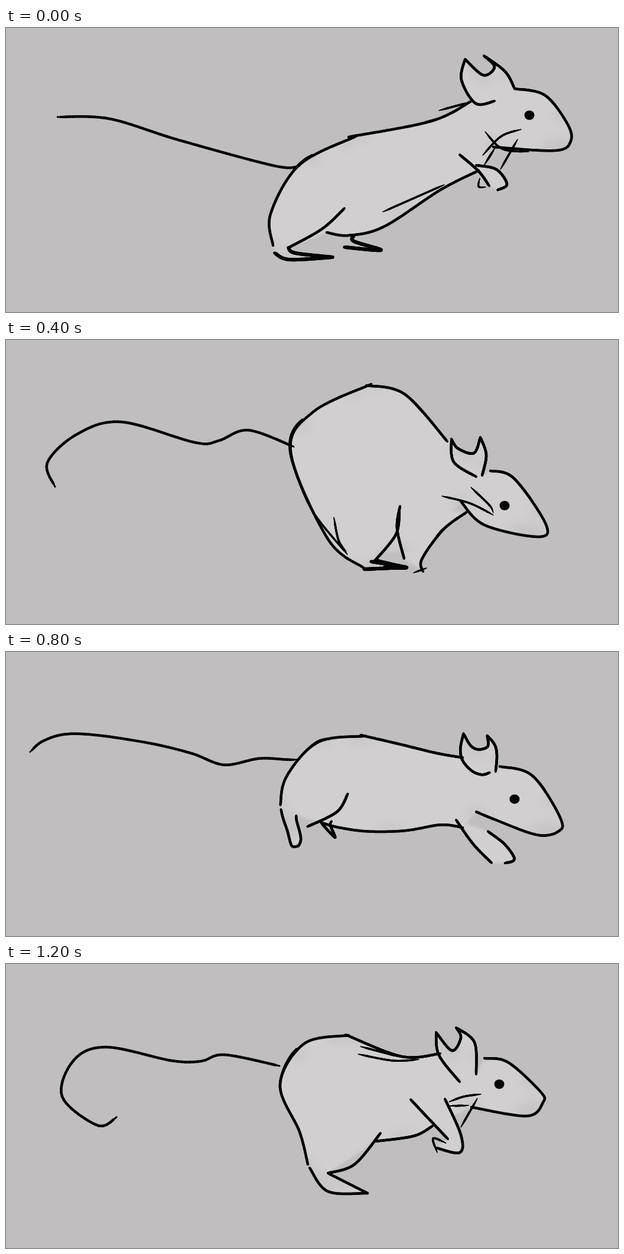
An HTML page with a canvas for the animation above (1.28 s loop, 1036x482 px).

```html
<!DOCTYPE html>
<html lang="en">
<head>
<meta charset="utf-8">
<title>Running mouse</title>
<style>
html, body { margin: 0; width: 100%; height: 100%; overflow: hidden; background: #c0bebf; }
canvas { display: block; width: 1036px; height: 482px; }
</style>
</head>
<body>
<canvas id="stage" width="1036" height="482"></canvas>
<script>
const ctx = document.getElementById('stage').getContext('2d');
const BG = '#c0bebf', SKIN = '#d1cfd0', INK = '#050505';
const STEP = 80, SAMPLES = 80, THICK = 4.5, THIN = 3.4;

// Each curve runs smoothly through a few key points; a repeated point is a corner.
// An eye has one place for each of the two laps.
const reach = {
  eyes: ['886 148', '884 143'],
  parts: {
    tail: '87 151 175 154 292 190 455 234 497 234',
    rump: '452 369 448 315 497 232 592 184',
    back: '580 185 720 158 788 124',
    earL: '777 53 771 88 795 128 827 124',
    earIn: '777 53 808 80 827 66 809 47',
    earR: '809 47 845 74 861 103',
    head: '861 103 912 114 950 162 956 192 930 208 825 202',
    cheek: '807 216 838 184 872 172',
    belly: '800 242 735 275 640 337 580 352 543 347',
    thigh: '573 306 535 341 478 373',
    armA: '768 215 800 243 818 268',
    armB: '796 233 830 240 848 265 832 275',
    hindFoot: '478 373 490 382 553 389 553 389 480 393 455 382',
    farFoot: '589 352 589 362 635 377 573 372'
  },
  extra: ['811 176 840 205 885 210', '866 189 837 240', '828 203 810 232', '802 255 800 269 812 270', '638 312 742 266', '733 140 785 126']
};

const dive = {
  eyes: ['822 310', '817 303'],
  parts: {
    tail: '55 179 72 151 120 132 235 138 315 156 370 179 430 155 490 157',
    rump: '472 205 491 158 540 115 605 122',
    back: '600 119 672 160 741 207',
    earL: '748 181 745 222 772 247 786 245',
    earIn: '748 181 757 204 780 208 789 189',
    earR: '789 189 798 212 783 253',
    head: '793 240 845 257 892 338 888 357 850 361 782 323 755 306',
    belly: '735 326 704 309 640 303 524 261',
    thigh: '573 208 565 237 524 258',
    armA: '735 320 762 370 795 403',
    armB: '797 340 834 391 820 400',
    hindFoot: '497 230 483 283 455 300 465 255 472 210',
    farFoot: '526 255 512 284 510 250'
  },
  extra: ['669 297 690 299 732 326', '762 320 776 362 802 396', '770 325 785 360 808 397', '786 400 828 396', '705 187 738 205', '494 240 540 259']
};

const crouch = {
  eyes: ['844 281', '844 277'],
  hidden: ['belly'],
  parts: {
    tail: '83 249 70 208 120 160 195 139 320 174 360 171 410 153 487 181',
    rump: '606 387 545 338 482 190 520 122 618 75',
    back: '610 77 675 92 747 172',
    earL: '754 168 758 207 796 232',
    earIn: '754 168 765 184 792 192 803 165',
    earR: '803 165 813 195 806 230',
    head: '820 222 860 235 914 313 900 334 810 314 770 274',
    cheek: '738 265 785 277 825 297',
    belly: '700 360 630 360',
    thigh: '666 290 660 330 625 374',
    armA: '780 292 740 322 704 372 706 393',
    armB: '667 282 662 320 674 371',
    hindFoot: '625 374 676 386 676 386 606 389',
    farFoot: '618 376 678 386 640 386'
  },
  extra: ['488 220 520 292 578 364', '555 301 563 340 576 359', '787 250 818 280 825 293', '690 395 712 387']
};

const rise = {
  eyes: ['836 207', '835 204'],
  hidden: ['farFoot'],
  parts: {
    tail: '187 260 155 274 95 225 115 163 170 141 280 164 330 165 370 154 463 173',
    rump: '511 340 497 285 464 205 505 135 580 121',
    back: '575 120 670 157 735 152',
    earL: '728 116 733 155 768 200',
    earIn: '728 116 755 147 770 125 762 108',
    earR: '762 108 793 133 796 187',
    head: '810 160 850 167 905 217 909 235 882 258 788 243',
    cheek: '750 234 775 225 804 221',
    belly: '722 275 690 292 625 301',
    thigh: '634 287 590 340 545 355',
    armA: '685 230 715 262 748 297',
    armB: '743 229 770 290 768 320 728 312',
    hindFoot: '545 355 612 389 612 389 545 386 514 346',
    farFoot: '550 360 600 380'
  },
  extra: ['600 140 668 158', '596 153 655 164 699 162', '798 228 770 277', '750 241 783 240', '745 304 723 296 730 320']
};

const mix = (a, b, k) => a + (b - a) * k;
const mixPts = (a, b, k) => a.map((p, i) => p.map((v, j) => mix(v, b[i][j], k)));

function points(text) {
  const n = text.split(' ').map(Number), pts = [];
  for (let i = 0; i < n.length; i += 2) pts.push([n[i], n[i + 1]]);
  return pts;
}

// Smooth curve through the points, sampled evenly by length.
function curve(text) {
  const pts = points(text);
  const at = i => pts[Math.max(0, Math.min(pts.length - 1, i))];
  const fine = [pts[0]], len = [0];
  for (let i = 0; i < pts.length - 1; i++) {
    const [a, b, c, d] = [at(i - 1), at(i), at(i + 1), at(i + 2)];
    if (b[0] === c[0] && b[1] === c[1]) continue;
    for (let s = 1; s <= 24; s++) {
      const t = s / 24;
      const p = [0, 1].map(j => b[j] + t / 2 * (c[j] - a[j] +
        t * (2 * a[j] - 5 * b[j] + 4 * c[j] - d[j] + t * (3 * (b[j] - c[j]) + d[j] - a[j]))));
      const q = fine[fine.length - 1];
      len.push(len[len.length - 1] + Math.hypot(p[0] - q[0], p[1] - q[1]));
      fine.push(p);
    }
  }
  const total = len[len.length - 1], out = [];
  for (let i = 0, k = 1; i <= SAMPLES; i++) {
    const want = total * i / SAMPLES;
    while (k < len.length - 1 && len[k] < want) k++;
    const t = (want - len[k - 1]) / (len[k] - len[k - 1] || 1);
    out.push(mixPts([fine[k - 1]], [fine[k]], t)[0]);
  }
  return out;
}

function keyPose({ eyes, parts, extra, hidden = [] }) {
  const curves = Object.entries(parts).map(([name, text]) => [name, curve(text)]);
  return { parts: Object.fromEntries(curves), extra: extra.map(curve), eyes: eyes.flatMap(points), hidden };
}

function between(a, b, k, stretch = 1) {
  const blend = (p, q) => mixPts(p, q, k).map(([x, y]) => [480 + (x - 480) * stretch, y]);
  const parts = {};
  for (const name in a.parts) {
    if (b.parts[name]) parts[name] = blend(a.parts[name], b.parts[name]);
  }
  return { parts, extra: [], eyes: blend(a.eyes, b.eyes), hidden: [] };
}

const [A, B, C, D] = [reach, dive, crouch, rise].map(keyPose);
const poses = [A, between(A, B, 1 / 3, 1.06), between(A, B, 2 / 3, 1.06), B, between(B, C, .5), C, between(C, D, .5), D];

function randomFrom(seed) {
  return () => (seed = seed * 16807 % 2147483647) / 2147483647;
}

function shape(pts) {
  const path = new Path2D();
  pts.forEach(([x, y]) => path.lineTo(x, y));
  path.closePath();
  return path;
}

// A brush line, narrower at its ends by the given share.
function ink(pts, width, tip = .8) {
  const gap = Math.hypot(pts[1][0] - pts[0][0], pts[1][1] - pts[0][1]);
  ctx.strokeStyle = INK;
  for (let i = 1; i < pts.length; i++) {
    const edge = Math.min(i, pts.length - i) * gap;
    ctx.lineWidth = width * Math.min(1, tip + edge / 20);
    ctx.beginPath();
    ctx.moveTo(...pts[i - 1]);
    ctx.lineTo(...pts[i]);
    ctx.stroke();
  }
}

// Goes over a random stretch of a line again, drifting off it slightly.
function retrace(pts, random) {
  const from = Math.floor(random() * SAMPLES * .65), count = Math.floor(SAMPLES * .3);
  const drift = mix(-3, 3, random());
  const part = pts.slice(from, from + count);
  ink(part.map(([x, y], i) => [x + drift * i / count, y + drift * (i / count - .5)]), THIN, .3);
}

function blob([x, y], rx, ry, color) {
  ctx.fillStyle = color;
  ctx.beginPath();
  ctx.ellipse(x, y, rx, ry, 0, 0, 7);
  ctx.fill();
}

function lineStyle(name, pts) {
  if (name === 'tail') return [THICK, .35];
  if (name === 'cheek') return [THIN, .35];
  const planted = name.endsWith('Foot') && pts[SAMPLES][1] > 365;
  return [planted ? 6 : THICK];
}

function draw(pose, lap) {
  const p = pose.parts, random = randomFrom(77);
  const join = names => names.flatMap(n => p[n]);
  const back = name => [...p[name]].reverse();
  const outline = join(['rump', 'back', 'earIn', 'earR', 'head', 'belly', 'hindFoot']);
  const body = shape(outline);
  const arms = shape([...p.armA, ...back('armB')]);
  const ear = shape([...p.earL, ...back('earR'), ...back('earIn')]);

  ctx.fillStyle = BG;
  ctx.fillRect(0, 0, 1036, 482);
  ctx.filter = 'blur(2px)';
  ctx.fillStyle = SKIN;
  [body, arms, ear].forEach(s => ctx.fill(s));

  // Faint shading inside the edge and on the snout
  ctx.save();
  ctx.clip(body);
  ctx.filter = 'blur(7px)';
  const shade = 'rgba(192,190,191,.4)';
  for (let i = 0; i < 14; i++) {
    blob(outline[Math.floor(random() * outline.length)], mix(12, 28, random()), mix(8, 18, random()), shade);
  }
  blob(p.head[Math.floor(SAMPLES * .6)], 34, 24, shade);
  ctx.restore();
  ctx.filter = 'none';

  ctx.lineCap = ctx.lineJoin = 'round';
  for (const name in p) {
    if (!pose.hidden.includes(name)) ink(p[name], ...lineStyle(name, p[name]));
  }
  pose.extra.forEach(pts => ink(pts, THIN, .35));
  for (const name of ['rump', 'rump', 'back', 'back', 'head', 'armA']) retrace(p[name], random);
  blob(pose.eyes[lap], 8.5, 8, INK);
}

let shown = -1;
function tick() {
  const step = Math.floor(performance.now() / STEP) % 16;
  if (step !== shown) {
    draw(poses[step % 8], step >> 3);
    shown = step;
  }
  requestAnimationFrame(tick);
}
tick();
</script>
</body>
</html>
```
